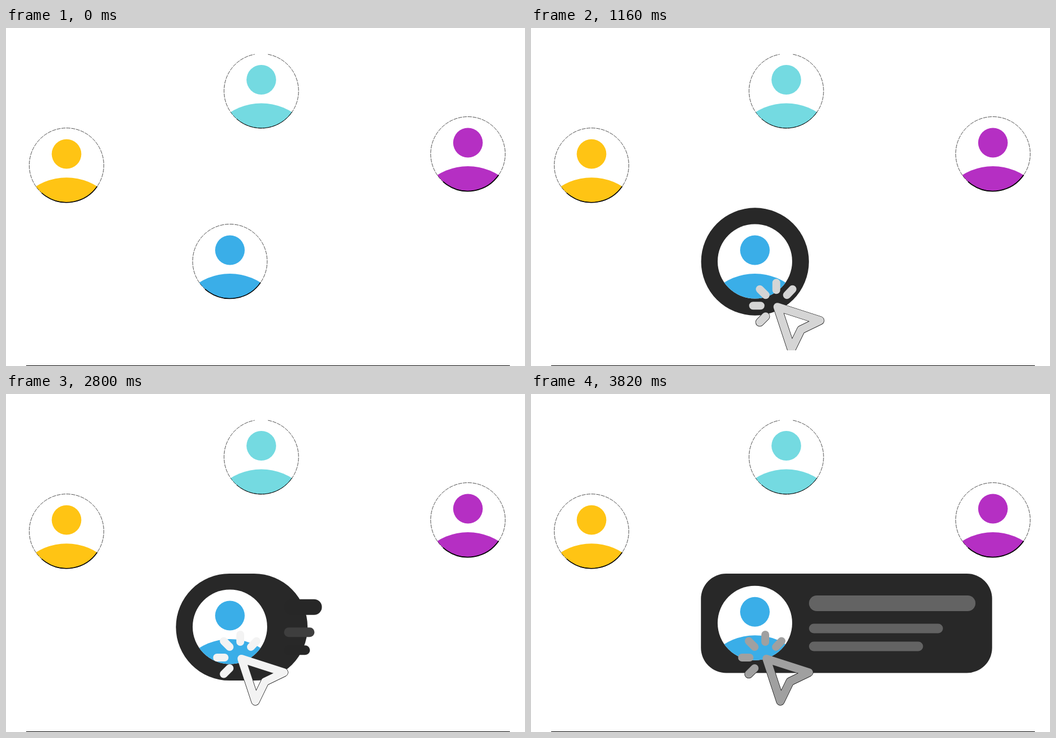
Write an HTML page with a canvas that moves like this. It is 926 px wide and 604 px high and loops after 4.3 s.

```html
<!DOCTYPE html>
<html lang="en">
<head>
<meta charset="utf-8">
<title>Profile card hover</title>
<style>
  html, body { margin: 0; width: 100%; height: 100%; overflow: hidden; background: #fff; }
  canvas { display: block; }
</style>
</head>
<body>
<canvas id="stage" width="926" height="604"></canvas>
<script>
const ctx = document.getElementById('stage').getContext('2d');
const LOOP = 4300, DARK = 40, RADIUS = 66.5;

const lerp = (a, b, p) => a + (b - a) * p;
const gray = v => `rgb(${v},${v},${v})`;

// Cubic bezier easing with control points (x1, 0) and (x2, 1).
function ease(t, start, end, x1, x2) {
  const x = Math.min(1, Math.max(0, (t - start) / (end - start)));
  let lo = 0, hi = 1;
  for (let i = 0; i < 20; i++) {
    const s = (lo + hi) / 2, r = 1 - s;
    if (3 * r * r * s * x1 + 3 * r * s * s * x2 + s * s * s < x) lo = s; else hi = s;
  }
  return x === 0 || x === 1 ? x : lo * lo * (3 - 2 * lo);
}

function disc(x, y, r, fill) {
  ctx.beginPath();
  ctx.arc(x, y, r, 0, 7);
  ctx.fillStyle = fill;
  ctx.fill();
}

function arc(x, y, from, to, width) {
  ctx.beginPath();
  ctx.arc(x, y, RADIUS, from, to);
  ctx.lineWidth = width;
  ctx.strokeStyle = '#000';
  ctx.stroke();
}

function avatar(x, y, color, rim, gap = 0) {
  ctx.save();
  ctx.beginPath();
  ctx.arc(x, y, RADIUS, 0, 7);
  ctx.fillStyle = '#fff';
  ctx.fill();
  ctx.clip();
  disc(x, y - 20, 26.4, color);
  disc(x, y + 124.5, 102.5, color);
  ctx.restore();
  if (!rim) return;
  ctx.setLineDash([7, 1.5]);
  arc(x, y, gap - Math.PI / 2, Math.PI * 1.5 - gap, 0.7);
  ctx.setLineDash([]);
  arc(x, y, 0.6, 2.3, rim);
}

function pill(x, y, w, h, r, fill) {
  ctx.beginPath();
  ctx.roundRect(x, y, w, h, Math.min(r, w / 2, h / 2));
  ctx.fillStyle = fill;
  ctx.fill();
}

const arrow = new Path2D('M420 473L496 497.5L462 514L445 549Z');
const lowerRay = new Path2D('M399 490L388.5 500.5');
const rays = new Path2D('M418 430V443M388.5 441.5L399 452M447 441.5L437 452M376.5 471H390');

function cursor(dx, dy, width, color, paths) {
  ctx.save();
  ctx.beginPath();
  ctx.rect(0, 0, 926, 576);
  ctx.clip();
  ctx.translate(dx, dy);
  ctx.lineCap = ctx.lineJoin = 'round';
  ctx.lineWidth = width;
  ctx.strokeStyle = color;
  for (const path of paths) ctx.stroke(path);
  ctx.restore();
}

function draw(t) {
  const approach = ease(t, 400, 1580, 0.3, 0.45);
  const grow = ease(t, 680, 1200, 0.42, 0.58);
  const open = ease(t, 2500, 3820, 0.42, 0.4);
  const lift = -7.75 * open;
  const dx = 119 * (1 - approach), dy = 153 * (1 - approach);

  ctx.fillStyle = '#fff';
  ctx.fillRect(0, 0, 926, 604);
  ctx.fillStyle = '#000';
  ctx.fillRect(36, 603, 863, 1);

  avatar(108, 245.2, '#ffc414', 1.5);
  avatar(455.5, 112.5, '#74dae1', 0.9, 0.18);
  avatar(824.2, 225, '#b52fc3', 1.8);

  if (t > 400) cursor(dx, dy, 15.4, '#000', [arrow, lowerRay]);

  if (grow > 0) {
    const r = lerp(RADIUS, 96.5, grow);
    pill(399.7 - r, 417.5 - r, 2 * r + 326.5 * open, 2 * r - 15.5 * open,
      lerp(150, 45, open), gray(DARK));
  }
  if (open > 0.1) {
    const scale = lerp(0.114, 1, open);
    const edge = gray(lerp(30, 99, open));
    const middle = gray(lerp(DARK, lerp(230, 98, open), open));
    pill(496, 367.75 + lift, 297 * scale, 28, 14, edge);
    pill(496, 418.25 + lift, 239 * scale, 17, 8.5, middle);
    pill(496, 450.25 + lift, 203.5 * scale, 17, 8.5, edge);
  }
  avatar(399.5, 417 + lift, '#3aaee8', grow > 0.1 ? 0 : 1.5);

  if (t > 400) {
    const shade = lerp(255 * approach, 160, open);
    cursor(dx, dy, 14, gray(shade), [arrow, lowerRay, rays]);
  }
}

function frame() {
  draw(performance.now() % LOOP);
  requestAnimationFrame(frame);
}
frame();
</script>
</body>
</html>
```
